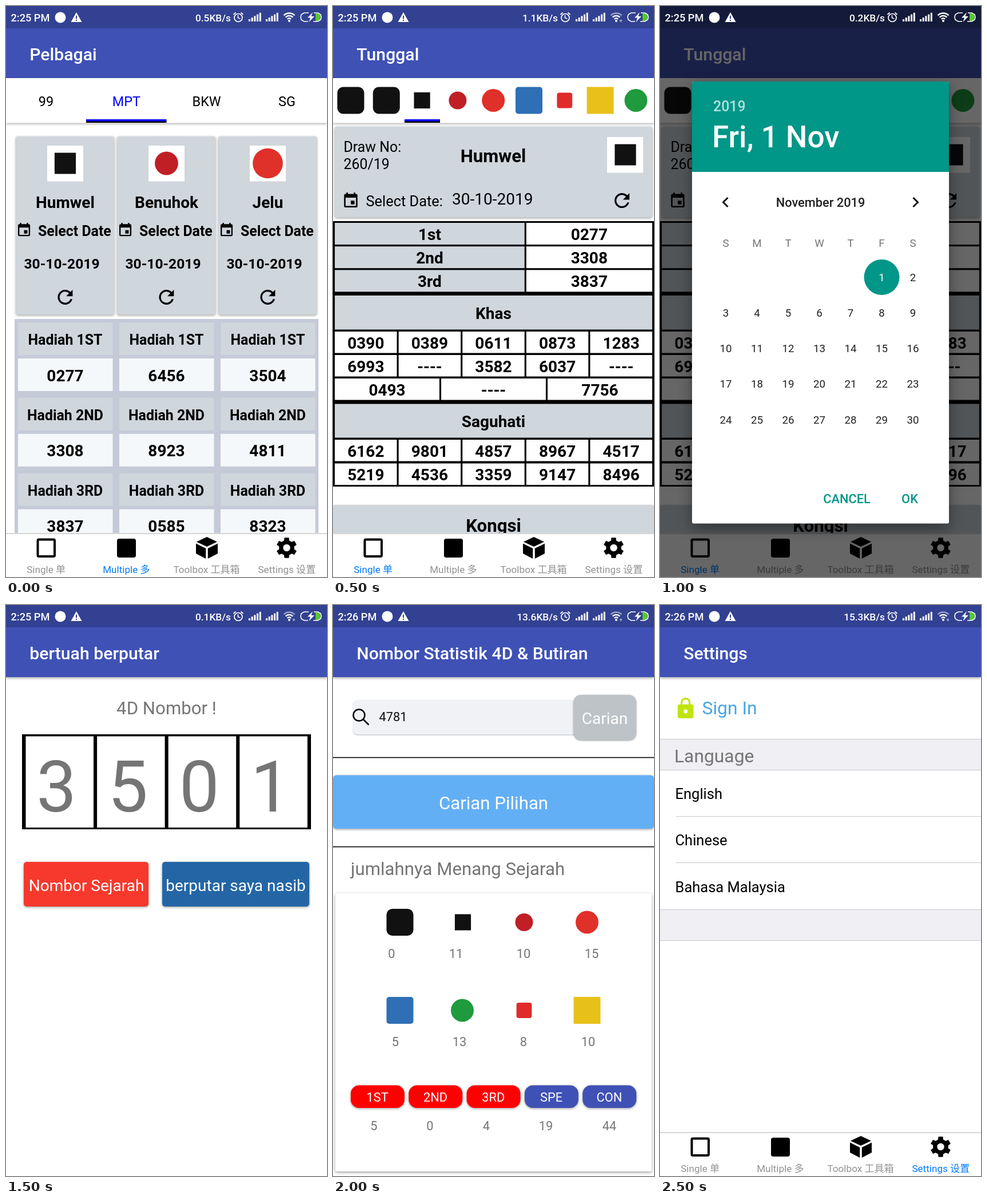
These frames come from a looping animation (561x998 px, 3000 ms). An HTML page with a canvas:

```html
<!DOCTYPE html>
<html lang="ms">
<head>
<meta charset="utf-8">
<style>
html, body { margin: 0; width: 100%; height: 100%; overflow: hidden; background: #fff; }
canvas { display: block; }
</style>
</head>
<body>
<canvas width="561" height="998"></canvas>
<script>
const W = 561, H = 998, LOOP = 3000, STEP = 500;
const ctx = document.querySelector('canvas').getContext('2d');
const INDIGO = '#3f51b5', PANEL = '#cfd6dc', TEAL = '#009688', GRAY = '#757575', RULE = '#c8c7cc';

// Material-style icons on a 24 unit grid
const ICON = {
  refresh: 'M17.65 6.35A8 8 0 1 0 19.73 14h-2.08A6 6 0 1 1 16.22 7.78L13 11h7V4z',
  event: 'M17 12h-5v5h5zM16 1v2H8V1H6v2H5a2 2 0 0 0-2 2V19a2 2 0 0 0 2 2h14a2 2 0 0 0 2-2V5a2 2 0 0 0-2-2h-1V1zM19 19H5V8h14z',
  lock: 'M18 8h-1V6A5 5 0 0 0 7 6v2H6a2 2 0 0 0-2 2v10a2 2 0 0 0 2 2h12a2 2 0 0 0 2-2V10a2 2 0 0 0-2-2zM12 17a2 2 0 1 1 0-4a2 2 0 0 1 0 4zM15.1 8H8.9V6a3.1 3.1 0 0 1 6.2 0z'
};

// name: [colour, share of the tile, corner rounding (0.5 = circle)]
const LOGO = {
  nines: ['#111', 1, .22], black: ['#111', .6, 0], runner: ['#c01f26', .66, .5],
  ring: ['#e0302a', .85, .5], blue: ['#2f6fb5', 1, .1], eights: ['#e02b2b', .57, .15],
  yellow: ['#e8c01a', 1, 0], green: ['#1f9a3c', .85, .5]
};

function rect(x, y, w, h, fill) {
  ctx.fillStyle = fill;
  ctx.fillRect(x, y, w, h);
}
function box(x, y, w, h, r, fill, blur = 0) {
  ctx.save();
  if (blur) {
    ctx.shadowColor = 'rgba(0,0,0,.4)';
    ctx.shadowBlur = blur;
    ctx.shadowOffsetY = blur / 3;
  }
  ctx.fillStyle = fill;
  ctx.beginPath();
  ctx.roundRect(x, y, w, h, r);
  ctx.fill();
  ctx.restore();
}
function text(str, x, y, size, color = '#000', weight = 400, align = 'center') {
  ctx.font = `${weight} ${size}px Roboto, "Noto Sans CJK SC", "Noto Sans CJK", sans-serif`;
  ctx.fillStyle = color;
  ctx.textAlign = align;
  ctx.fillText(str, x, y);
}
const left = (str, x, y, size, color, weight) => text(str, x, y, size, color, weight, 'left');
const bold = (str, x, y, size = 28) => text(str, x, y, size, '#000', 700);

function poly(points, fill) {
  ctx.fillStyle = fill;
  ctx.beginPath();
  points.forEach(p => ctx.lineTo(...p));
  ctx.fill();
}
function line(points, width, color) {
  ctx.strokeStyle = color;
  ctx.lineWidth = width;
  ctx.beginPath();
  points.forEach(p => ctx.lineTo(...p));
  ctx.stroke();
}
function arc(x, y, r, width, color, from = 0, to = 7) {
  ctx.strokeStyle = color;
  ctx.lineWidth = width;
  ctx.beginPath();
  ctx.arc(x, y, r, from, to);
  ctx.stroke();
}
function dot(x, y, r, fill) {
  box(x - r, y - r, 2 * r, 2 * r, r, fill);
}
function icon(name, x, y, scale, color = '#000') {
  ctx.save();
  ctx.translate(x, y);
  ctx.scale(scale, scale);
  ctx.fillStyle = color;
  ctx.fill(new Path2D(ICON[name]), 'evenodd');
  ctx.restore();
}
function logo(name, cx, cy, tile = 47) {
  const [color, share, round] = LOGO[name], s = tile * share;
  box(cx - s / 2, cy - s / 2, s, s, s * round, color);
}

function statusBar(time, speed, wifiFull) {
  left(time, 8.5, 26.5, 18.2, '#fff', 500);
  dot(95, 20, 9.5, '#fff');
  poly([[123, 11], [132.5, 28], [113.5, 28]], '#fff');
  rect(122, 17, 2, 5.5, '#324191');
  rect(122, 24, 2, 2, '#324191');
  text(speed, 393, 26.5, 17.3, '#fff', 500, 'right');
  arc(406, 20.5, 7, 1.7, '#fff');
  line([[405.5, 16], [405.5, 21], [409.5, 22]], 1.5, '#fff');
  line([[397.5, 15], [401.5, 11.5]], 1.7, '#fff');
  line([[414.5, 15], [410.5, 11.5]], 1.7, '#fff');
  for (const x of [424, 454])
    for (let i = 0; i < 5; i++) rect(x + i * 4.7, 23 - i * 2.8, 3, 4 + i * 2.8, '#fff');
  [4.5, 9, 13.5].forEach((r, i) =>
    arc(495, 26, r, 2.5, wifiFull || i < 2 ? '#fff' : 'rgba(255,255,255,.5)', -2.35, -.79));
  dot(495, 26, 2, '#fff');
  if (!wifiFull) text('e', 503, 28, 8, '#fff');
  box(541, 13, 8.5, 13.5, [0, 5, 5, 0], '#55c92f');
  line([[529, 12], [521, 12], [516, 15], [515, 19.5], [516, 24], [521, 27], [528, 27]], 1.6, '#fff');
  line([[538, 12], [545, 12], [550, 15], [551, 19.5], [550, 24], [545, 27], [537, 27]], 1.6, '#fff');
  poly([[536, 11], [527, 20.5], [532, 20.5], [529.5, 28], [539, 18], [533.5, 18]], '#fff');
}

function header(title) {
  box(0, 39, W, 87, 0, INDIGO, 5);
  rect(0, 0, W, 39, '#324191');
  left(title, 41.2, 95, 30.2, '#fff', 500);
}

function tabStrip(x, w) {
  box(0, 126, W, 78.5, 0, '#fff', 5);
  rect(x, 198, w, 4, '#00f');
  rect(x, 201.5, w, 2.5, '#000');
}

function gear(cx, cy) {
  const points = [];
  for (let i = 0; i < 6; i++)
    for (const [a, r] of [[-.34, 13.5], [-.22, 18.2], [.22, 18.2], [.34, 13.5]]) {
      const angle = i * Math.PI / 3 - Math.PI / 2 + a;
      points.push([cx + r * Math.cos(angle), cy + r * Math.sin(angle)]);
    }
  poly(points, '#000');
  dot(cx, cy, 6.2, '#fff');
}

function bottomBar(active) {
  rect(0, 921, W, 77, '#fff');
  rect(0, 921.5, W, 1.2, '#bbb');
  ctx.strokeStyle = '#000';
  ctx.lineWidth = 4;
  ctx.beginPath();
  ctx.roundRect(55.5, 932.5, 29.5, 29.5, 2);
  ctx.stroke();
  box(194, 931, 33, 33, 4, '#000');
  poly([[351, 928], [369, 936.5], [351, 945], [333, 936.5]], '#000');
  for (const side of [-1, 1])
    poly([[19, 939.5], [1.8, 948], [1.8, 966], [19, 957]].map(([x, y]) => [351 + side * x, y]), '#000');
  gear(490.5, 947);
  ['Single 单', 'Multiple 多', 'Toolbox 工具箱', 'Settings 设置'].forEach((label, i) =>
    text(label, 70.1 + i * 140.25, 991, 17.1, i === active ? '#007aff' : '#929292'));
}

function resultsScreen() {
  header('Pelbagai');
  tabStrip(140, 140.5);
  ['99', 'MPT', 'BKW', 'SG'].forEach((tab, i) =>
    text(tab, 70 + i * 140.3, 175, 23.4, i === 1 ? '#00f' : '#000'));
  rect(15, 547, 531, 380, '#c4cad8');
  const prizes = [['1ST', '0277', '6456', '3504'], ['2ND', '3308', '8923', '4811'], ['3RD', '3837', '0585', '8323']];
  ['Humwel', 'Benuhok', 'Jelu'].forEach((name, i) => {
    const x = i * 177, cx = 103.5 + x;
    box(17.5 + x, 228, 171.5, 311.5, 3, PANEL, 4);
    rect(72 + x, 244, 63, 62.5, '#fff');
    logo(['black', 'runner', 'ring'][i], cx, 275, 62);
    bold(name, cx, 352.5);
    icon('event', 17.5 + x, 377.8, 1.17);
    left('Select Date', 56 + x, 402, 24.9, '#000', 700);
    bold('30-10-2019', 97.5 + x, 459, 24.6);
    icon('refresh', 84 + x, 489.5, 1.62);
    prizes.forEach((row, j) => {
      const y = j * 131.8;
      rect(21 + x, 553 + y, 165.5, 57, PANEL);
      rect(21 + x, 616 + y, 165.5, 57, '#f5f8fa');
      bold('Hadiah ' + row[0], cx, 592 + y, 24.9);
      bold(row[i + 1], cx, 655.5 + y);
    });
  });
  bottomBar(1);
}

// One table row; every cell has a 1dp border, the first cell may be wider
function tableRow(y, h, labels, fill = '#fff', firstShare = 1 / labels.length) {
  const dp = W / 360, inner = W - 2 * dp;
  let x = dp;
  labels.forEach((label, i) => {
    const w = inner * (i ? (1 - firstShare) / (labels.length - 1) : firstShare);
    rect(x + dp, y, w - 2 * dp, h, i ? '#fff' : fill);
    bold(label, x + w / 2, y + h / 2 + 11);
    x += w;
  });
}

function singleScreen() {
  header('Tunggal');
  tabStrip(125, 62);
  const tabs = ['nines', 'nines', 'black', 'runner', 'ring', 'blue', 'eights', 'yellow', 'green'];
  tabs.forEach((name, i) => logo(name, 31 + i * 62.3, 165));

  box(3, 211, 555, 158.5, 4, PANEL, 4);
  left('Draw No:', 18.5, 255, 24.9);
  left('260/19', 18.5, 284.5, 24.9);
  bold('Humwel', 280, 273, 31.2);
  rect(479, 229, 63, 62.5, '#fff');
  logo('black', 511, 260, 62);
  icon('event', 15.5, 324.7, 1.3);
  left('Select Date:', 57.5, 349.5, 25.4);
  left('30-10-2019', 208, 347, 28);
  icon('refresh', 485.5, 320.5, 1.63);

  rect(0, 376, W, 464, '#000');
  [['1st', '0277'], ['2nd', '3308'], ['3rd', '3837']].forEach((row, i) =>
    tableRow(379 + i * 41.2, 38, row, PANEL, .6));
  tableRow(506, 59.5, ['Khas'], PANEL);
  tableRow(569, 37.5, ['0390', '0389', '0611', '0873', '1283']);
  tableRow(610, 37.5, ['6993', '----', '3582', '6037', '----']);
  tableRow(651, 37.5, ['0493', '----', '7756']);
  tableRow(695.5, 59, ['Saguhati'], PANEL);
  tableRow(758, 37.5, ['6162', '9801', '4857', '8967', '4517']);
  tableRow(799.5, 37.5, ['5219', '4536', '3359', '9147', '8496']);

  box(0, 872, W, 70, 4, PANEL, 3);
  bold('Kongsi', 280.5, 919, 31.2);
  bottomBar(0);
}

function dateScreen() {
  singleScreen();
  rect(0, 0, W, H, 'rgba(0,0,0,.6)');
  box(56, 132, 449, 772.5, 3, '#fff', 24);
  box(56, 132, 449, 158, [3, 3, 0, 0], TEAL);
  left('2019', 93, 184, 24.9, 'rgba(255,255,255,.7)', 500);
  left('Fri, 1 Nov', 91, 247, 53, '#fff', 500);
  text('November 2019', 280.5, 351, 21.8, '#212121', 500);
  line([[118.5, 335], [110.5, 343], [118.5, 351]], 3, '#111');
  line([[442.5, 335], [450.5, 343], [442.5, 351]], 3, '#111');
  const column = i => 115 + i * 54.5;
  [...'SMTWTFS'].forEach((day, i) => text(day, column(i), 421, 18.7, GRAY));
  dot(387.5, 474, 31, TEAL);
  for (let day = 1; day <= 30; day++) {
    const cell = day + 4;
    text(day, column(cell % 7), 480.5 + Math.floor(cell / 7) * 62.3, 18.7, day === 1 ? '#fff' : '#212121');
  }
  text('CANCEL', 326.5, 869, 21.8, TEAL, 500);
  text('OK', 436.5, 869, 21.8, TEAL, 500);
}

function spinScreen() {
  header('bertuah berputar');
  text('4D Nombor !', 280.5, 191, 31.2, GRAY);
  rect(28, 226, 505, 166, '#000');
  [...'3501'].forEach((digit, i) => {
    rect(34.5 + i * 124.6, 229.5, 118.5, 159.5, '#fff');
    left(digit, 53.3 + i * 124.7, 361, 124.7, GRAY);
  });
  box(31, 449, 218, 78, 5, '#f7392d', 4);
  box(273, 449, 257, 78, 5, '#2466a5', 4);
  text('Nombor Sejarah', 140.5, 500, 28, '#fff');
  text('berputar saya nasib', 401.5, 500, 28, '#fff');
}

function statsScreen() {
  header('Nombor Statistik 4D & Butiran');
  box(34, 166, 420, 62, 9, '#ccd0d8');
  box(34, 165.5, 420, 61, 9, '#f0f2f5');
  arc(45.5, 192.5, 10, 2.5, '#000');
  line([[52.5, 199.5], [62.5, 209.5]], 2.7, '#000');
  left('4781', 80.5, 203, 21.8, '#111');
  box(420.5, 157, 109.5, 79, 13, '#bdc3c7', 3);
  text('Carian', 475, 208, 28, '#fff');
  rect(0, 265.8, W, 1.6, '#000');
  rect(0, 421.8, W, 1.6, '#000');
  box(0, 297.5, W, 93.5, 6, '#63aff6', 4);
  text('Carian Pilihan', 280.5, 356.5, 31.2, '#fff');
  left('jumlahnya Menang Sejarah', 31, 471.5, 31.2, GRAY);

  box(4, 504, 553, 486, 3, '#fff', 5);
  const totals = [
    ['nines', 117, 0, 102.5], ['black', 227, 11, 215], ['runner', 334, 10, 333], ['ring', 444, 15, 452],
    ['blue', 117, 5, 109], ['green', 226, 13, 221], ['eights', 334, 8, 333], ['yellow', 444, 10, 446]
  ];
  totals.forEach(([name, x, count, countX], i) => {
    const y = i < 4 ? 554.5 : 708.5;
    logo(name, x, y);
    text(count, countX, y + 62.5, 21.8, GRAY);
  });
  const places = [['1ST', 5, 71.5], ['2ND', 0, 169.5], ['3RD', 4, 268], ['SPE', 19, 372], ['CON', 44, 483]];
  places.forEach(([label, count, countX], i) => {
    const x = 31 + i * 101.3;
    box(x, 839.5, 94, 39.5, 14.5, i < 3 ? '#f00' : INDIGO, 4);
    text(label, x + 46.7, 867.5, 21.8, '#fff');
    text(count, countX, 918, 21.8, GRAY);
  });
}

function settingsScreen() {
  header('Settings');
  icon('lock', 24, 160, 1.73, '#bfe40f');
  left('Sign In', 73.5, 191, 31.8, '#48a5e8');
  for (const y of [234, 532]) {
    rect(0, y, W, 55, RULE);
    rect(0, y + 1, W, 53, '#efeff4');
  }
  left('Language', 25, 275, 31.8, GRAY);
  ['English', 'Chinese', 'Bahasa Malaysia'].forEach((name, i) =>
    left(name, 26.5, 338.5 + i * 81.7, 25.5));
  rect(28, 369, W, 1, RULE);
  rect(28, 450, W, 1, RULE);
  bottomBar(3);
}

const scenes = [
  [resultsScreen, '2:25 PM', '0.5KB/s', true],
  [singleScreen, '2:25 PM', '1.1KB/s', false],
  [dateScreen, '2:25 PM', '0.2KB/s', true],
  [spinScreen, '2:25 PM', '0.1KB/s', false],
  [statsScreen, '2:26 PM', '13.6KB/s', false],
  [settingsScreen, '2:26 PM', '15.3KB/s', false]
];

function draw() {
  const [screen, ...status] = scenes[Math.floor(performance.now() % LOOP / STEP)];
  rect(0, 0, W, H, '#fff');
  screen();
  statusBar(...status);
  requestAnimationFrame(draw);
}
draw();
</script>
</body>
</html>
```
